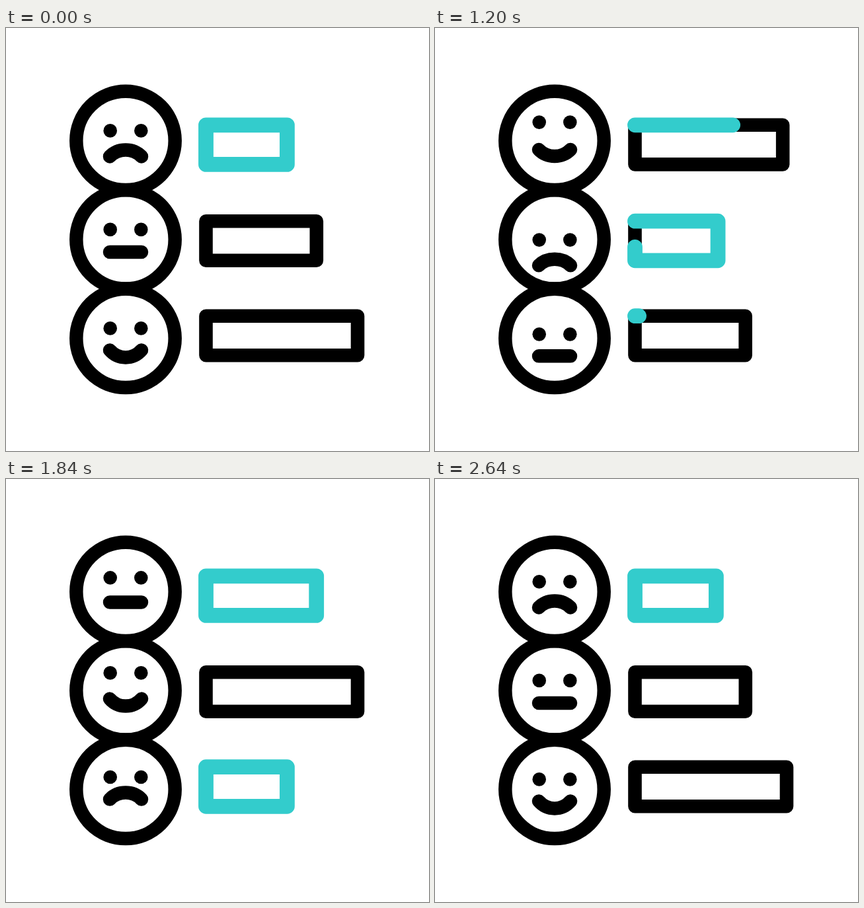
These frames come from a looping animation (640x640 px, 3 s). An HTML page:

```html
<!DOCTYPE html>
<html>
<head>
<meta charset="utf-8">
<style>
html, body { margin: 0; width: 100%; height: 100%; overflow: hidden; background: #fff; }
svg { display: block; width: 100vw; height: 100vh; }
</style>
</head>
<body>
<svg id="stage" viewBox="0 0 640 640"></svg>
<script>
const LOOP = 3000, START = 200, STAGE = 800, STAGGER = 80, SPAN = 600;
const INK = '#000', TEAL = '#33cccc';
const FACE_X = 181, FACE_Y = 170.4, PITCH = 149.5;
const LEFT = 302.5, HALF = 29.8;

// A mood sets the bar's right edge and how far the mouth bends.
const moods = {
  sad: { right: 425.4, bend: -10 },
  flat: { right: 469.8, bend: 0 },
  smile: { right: 532, bend: 11 }
};

// Each row visits its moods in turn; eye and mouth heights are from the face centre.
const rows = [
  { barY: 176.6, moods: ['sad', 'smile', 'flat'], eyeY: [-15, -28.5, -21], mouthY: [24, 13.4, 16], teal: [1, 0, 1] },
  { barY: 322, moods: ['flat', 'sad', 'smile'], eyeY: [-15, 1.4, -26.5], mouthY: [19, 40, 12.7], teal: [0, 1, 0] },
  { barY: 465.5, moods: ['smile', 'flat', 'sad'], eyeY: [-15, -6, -18.4], mouthY: [18, 27, 15.2], teal: [0, 0, 1] }
];

const stage = document.getElementById('stage');

function set(el, attrs) {
  for (const key in attrs) el.setAttribute(key, attrs[key]);
}

function add(tag, attrs) {
  const el = document.createElementNS('http://www.w3.org/2000/svg', tag);
  set(el, attrs);
  stage.appendChild(el);
  return el;
}

function line(color, width) {
  return add('path', {
    fill: 'none', stroke: color, 'stroke-width': width,
    'stroke-linecap': 'round', 'stroke-linejoin': 'round'
  });
}

rows.forEach((row, i) => {
  row.cy = FACE_Y + i * PITCH;
  add('circle', { cx: FACE_X, cy: row.cy, r: 74.7, fill: 'none', stroke: INK, 'stroke-width': 20.5 });
  row.eyes = [-1, 1].map(side => add('circle', { cx: FACE_X + side * 23.3, r: 10.3, fill: INK }));
  row.mouth = line(INK, 20.5);
  row.bar = line(INK, 20.6);
  row.trace = line(TEAL, 22.8);
});

const clamp = (v, lo, hi) => Math.max(lo, Math.min(hi, v));
const mix = (a, b, p) => a + (b - a) * p;
const soft = u => u * u * (3 - 2 * u);

// cubic-bezier(.85, 0, .13, 1), solved by bisection
function sharp(u) {
  let lo = 0, hi = 1;
  for (let i = 0; i < 24; i++) {
    const s = (lo + hi) / 2, r = 1 - s;
    const x = 3 * s * r * (0.85 * r + 0.13 * s) + s ** 3;
    if (x < u) lo = s; else hi = s;
  }
  return soft(lo);
}

function drawRow(row, index, t) {
  const local = t - START - index * STAGGER;
  const step = clamp(Math.floor(local / STAGE), 0, 2);
  const next = (step + 1) % 3;
  const u = clamp((local - step * STAGE) / SPAN, 0, 1);
  const p = sharp(u);
  const between = list => mix(list[step], list[next], p);
  const mood = key => between(row.moods.map(name => moods[name][key]));

  row.eyes.forEach(eye => set(eye, { cy: row.cy + between(row.eyeY) }));
  const endY = row.cy + between(row.mouthY);
  const pull = endY + mood('bend') * 4 / 3;
  set(row.mouth, {
    d: `M${FACE_X - 24} ${endY}C${FACE_X - 11.3} ${pull} ${FACE_X + 11.3} ${pull} ${FACE_X + 24} ${endY}`
  });

  const right = mood('right');
  const top = row.barY - HALF, bottom = row.barY + HALF;
  const d = `M${LEFT} ${top}H${right}V${bottom}H${LEFT}Z`;
  const length = 2 * (right - LEFT) + 4 * HALF;
  const share = mix(row.teal[step], row.teal[next], soft(u));
  set(row.bar, { d });
  set(row.trace, {
    d,
    'stroke-dasharray': share < 1 ? `${share * length} ${length * 2}` : 'none',
    visibility: share > 0 ? 'visible' : 'hidden'
  });
}

function draw(t) {
  rows.forEach((row, i) => drawRow(row, i, t));
}

const begin = performance.now();
function tick() {
  draw((performance.now() - begin) % LOOP);
  requestAnimationFrame(tick);
}
draw(0);
requestAnimationFrame(tick);
</script>
</body>
</html>
```
